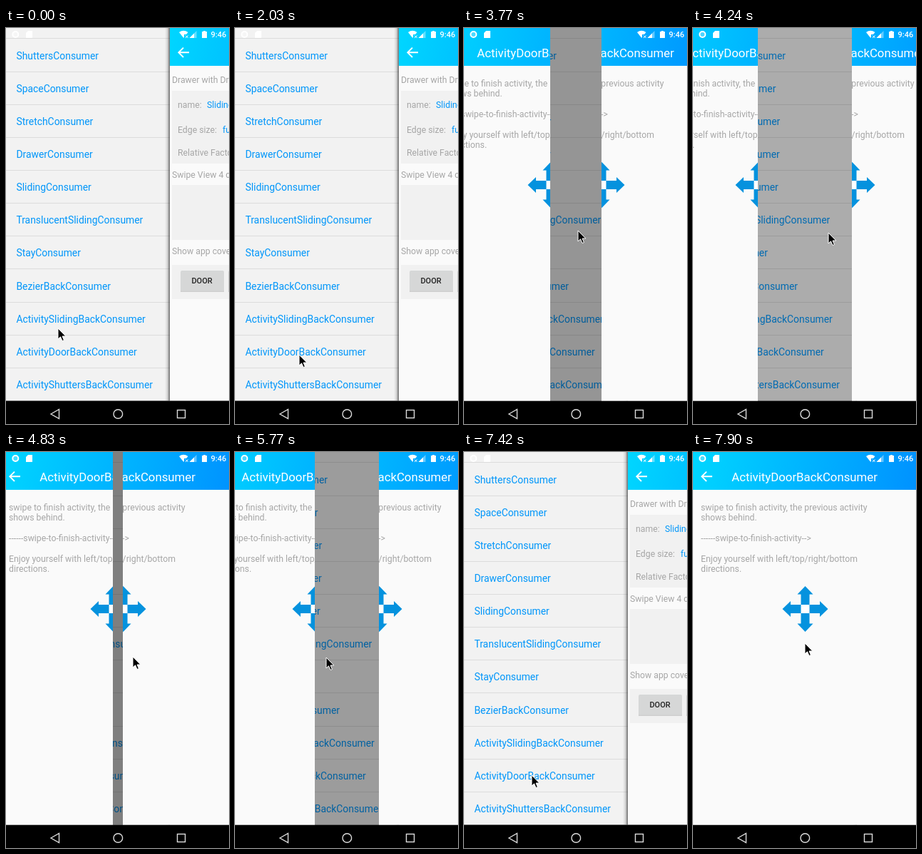
These frames come from a looping animation (313 px wide and 555 px high, 8000 ms). An HTML page:

```html
<!DOCTYPE html>
<html lang="en">
<head>
<meta charset="utf-8">
<title>Door swipe</title>
<style>
  html, body { margin: 0; width: 100%; height: 100%; overflow: hidden; background: #000; }
  svg { display: block; width: 313px; height: 555px; font-family: Roboto, sans-serif; }
  .list { font-size: 13.9px; fill: #0096fa; }
  .body { font-size: 12.25px; fill: #a6a6a6; white-space: pre; }
  .blue { fill: #0096fa; }
  .title { font-size: 16.8px; fill: #fff; }
  .line { fill: none; stroke: #fff; stroke-width: 1.9; }
  .nav { fill: none; stroke: #dcdcdc; stroke-width: 1.4; }
</style>
</head>
<body>
<svg viewBox="0 0 313 555">
  <defs>
    <linearGradient id="sky" gradientUnits="userSpaceOnUse" x1="0" y1="0" x2="313" y2="53">
      <stop offset="0" stop-color="#00d6ff"/>
      <stop offset="1" stop-color="#0092ff"/>
    </linearGradient>
    <linearGradient id="edge">
      <stop offset="0" stop-opacity="0"/>
      <stop offset=".5" stop-opacity=".12"/>
      <stop offset="1" stop-opacity=".55"/>
    </linearGradient>
    <clipPath id="clipL"><rect width="157" height="523"/></clipPath>
    <clipPath id="clipR"><rect x="157" width="156" height="523"/></clipPath>
    <clipPath id="screen"><rect width="313" height="522.5"/></clipPath>

    <g id="bar">
      <rect width="313" height="53" fill="url(#sky)"/>
      <path class="line" d="M27 34.3H12.5M19 27.6L12.3 34.3L19 41"/>
    </g>
    <path id="arm" d="M0 -32L11 -20.5H6V-6H-6V-20.5H-11Z" fill="#0592de"/>

    <g id="page">
      <rect width="313" height="522.5" fill="#fafafa"/>
      <use href="#bar"/>
      <text class="title" x="54.3" y="41">ActivityDoorBackConsumer</text>
      <g class="body">
        <text x="11" y="81.5">swipe to finish activity, the previous activity</text>
        <text x="11" y="96">shows behind.</text>
        <text x="11" y="125">------swipe-to-finish-activity--&gt;</text>
        <text x="11" y="154">Enjoy yourself with left/top/right/bottom</text>
        <text x="11" y="168">directions.</text>
      </g>
      <g transform="translate(157.5 220)">
        <rect x="-6" y="-6" width="12" height="12" fill="#fff"/>
        <use href="#arm"/>
        <use href="#arm" transform="rotate(90)"/>
        <use href="#arm" transform="rotate(180)"/>
        <use href="#arm" transform="rotate(270)"/>
      </g>
    </g>
  </defs>

  <rect width="313" height="555"/>

  <g clip-path="url(#screen)">
    <g transform="translate(230)">
      <rect width="313" height="523" fill="#fafafa"/>
      <use href="#bar"/>
      <path d="M3 88H90V190H3ZM3 220H90V297H3ZM3 332H90V380H3Z" fill="#f1f1f1"/>
      <g class="body">
        <text x="3" y="77">Drawer with DrawerConsumer</text>
        <text x="11" y="111.5">name:</text>
        <text class="blue" x="52" y="111.5">SlidingConsumer</text>
        <text x="11" y="147">Edge size:</text>
        <text class="blue" x="74" y="147">full</text>
        <text x="11" y="179">Relative Factor</text>
        <text x="3" y="210">Swipe View 4 directions</text>
        <text x="3" y="317">Show app cover</text>
      </g>
      <path d="M15 342H76V370H15ZM82 342H100V370H82Z" opacity=".14"/>
      <rect x="15" y="340" width="61" height="28.5" rx="2" fill="#d6d7d7"/>
      <rect x="82" y="340" width="61" height="28.5" rx="2" fill="#d6d7d7"/>
      <text x="45" y="358" text-anchor="middle" font-size="11" font-weight="500" fill="#222">DOOR</text>
    </g>
    <rect width="230" height="523" fill="#f2f2f2"/>
    <g id="rows" class="list"></g>
    <rect x="223" width="7" height="523" fill="url(#edge)"/>
    <rect id="scrim" width="313" height="523"/>
  </g>

  <g id="doors">
    <g id="left"><use href="#page" clip-path="url(#clipL)"/></g>
    <g id="right"><use href="#page" clip-path="url(#clipR)"/></g>
  </g>

  <g fill="#fff">
    <circle cx="13.3" cy="9" r="4" fill-opacity=".3" stroke="#fff" stroke-width="2"/>
    <path d="M31 4H37V14H28V7Z"/>
    <path d="M243 6Q249 1.5 255.5 6L253 9H250V12.5L249.3 14Z"/>
    <path d="M252 10.5L255.5 14M255.5 10.5L252 14" stroke="#fff"/>
    <path d="M267.5 4V14H257.5Z" opacity=".4"/>
    <path d="M264 7.5V14H257.5Z"/>
    <path d="M275 5H277V4H280V5H282V14H275Z"/>
    <text x="287.5" y="13" font-size="11" font-weight="500">9:46</text>
  </g>

  <g class="nav">
    <path d="M63 541L74.5 534.5V547.5Z"/>
    <circle cx="157.3" cy="541" r="6.3"/>
    <rect x="240.5" y="535.5" width="11" height="11"/>
  </g>

  <path id="cursor" d="M0 0V15L3.5 11.8L6 17.5L8.4 16.5L6 11H10.8Z" stroke="#fff"/>
</svg>

<script>
const LOOP = 8000, HALF = 157;
const $ = id => document.getElementById(id);

const names = ['Shutters', 'Space', 'Stretch', 'Drawer', 'Sliding', 'TranslucentSliding',
  'Stay', 'BezierBack', 'ActivitySlidingBack', 'ActivityDoorBack', 'ActivityShuttersBack'];
$('rows').innerHTML = names.map((name, i) => {
  const y = 14.4 + 46.15 * i;
  return `<rect y="${Math.round(y)}" width="230" height="1" fill="#dcdcdc"/>` +
    `<text x="14.4" y="${(y + 29.1).toFixed(1)}">${name}Consumer</text>`;
}).join('');

const smooth = u => u * u * (3 - 2 * u);
const easeOut = u => 1 - (1 - u) ** 2;
const easeIn = u => u ** 1.4;
const progress = (t, start, end) => Math.min(1, Math.max(0, (t - start) / (end - start)));

const firstDrag = { down: 3420, release: 4560, rest: 4950, origin: 124, settle: 0 };
const secondDrag = { down: 5070, release: 6350, rest: 6580, origin: 173, settle: HALF };

// The pointer rests between moves.
const home = { x: 73, y: 421 };
const moves = [
  { start: 230, end: 590, x: 104, y: 443 },
  { start: 710, end: 1100, x: 126, y: 423 },
  { start: 1100, end: 2030, x: 90, y: 458 },
  { start: 2380, end: 3300, x: 119, y: 281 },
  { start: firstDrag.down, end: 4480, x: 194, y: 287, ease: easeOut },
  { start: firstDrag.release, end: firstDrag.rest, x: 173, y: 287 },
  { start: secondDrag.down, end: secondDrag.release, x: 69, y: 290, ease: easeIn },
  { start: 6600, end: 7310, x: 95, y: 453 },
  { start: 7430, end: 7880, x: 157, y: 268 }
];

function pointer(t) {
  return moves.reduce((p, m) => {
    const u = (m.ease || smooth)(progress(t, m.start, m.end));
    return { x: p.x + (m.x - p.x) * u, y: p.y + (m.y - p.y) * u };
  }, home);
}

// Doors follow the pointer, then settle shut or fully open.
function opening(t) {
  const drag = t < secondDrag.down ? firstDrag : secondDrag;
  if (t < drag.down) return 0;
  const reach = pointer(Math.min(t, drag.release)).x - drag.origin;
  const pulled = Math.max(0, drag === firstDrag ? reach : -reach);
  return pulled + (drag.settle - pulled) * easeOut(progress(t, drag.release, drag.rest));
}

const beats = [[0, 350], [350, 120], [2260, 115.5], [3300, 117.4], [4240, 117.6]];
function snap(t) {
  const [start, step] = beats.filter(b => b[0] <= t).pop();
  return start + Math.floor((t - start) / step) * step;
}

const move = (id, x, y) => $(id).setAttribute('transform', `translate(${x} ${y})`);

function draw(t) {
  const { x, y } = pointer(t);
  move('cursor', Math.round(x), Math.round(y));

  const reopened = t >= 7560;
  const age = t - (reopened ? 7560 : 2470);
  const gap = reopened ? 0 : Math.round(opening(t));
  const shown = age >= 0 && gap < HALF;

  $('doors').setAttribute('opacity', shown ? easeOut(progress(age, 0, 200)) : 0);
  move('doors', 0, 44 * (1 - progress(age, 0, 350)) ** 5);
  move('left', -gap, 0);
  move('right', gap, 0);
  $('scrim').setAttribute('opacity', gap ? 0.5 * (1 - gap / HALF) : 0);
}

const begin = performance.now();
function tick() {
  draw(snap((performance.now() - begin) % LOOP));
  requestAnimationFrame(tick);
}
tick();
</script>
</body>
</html>
```
